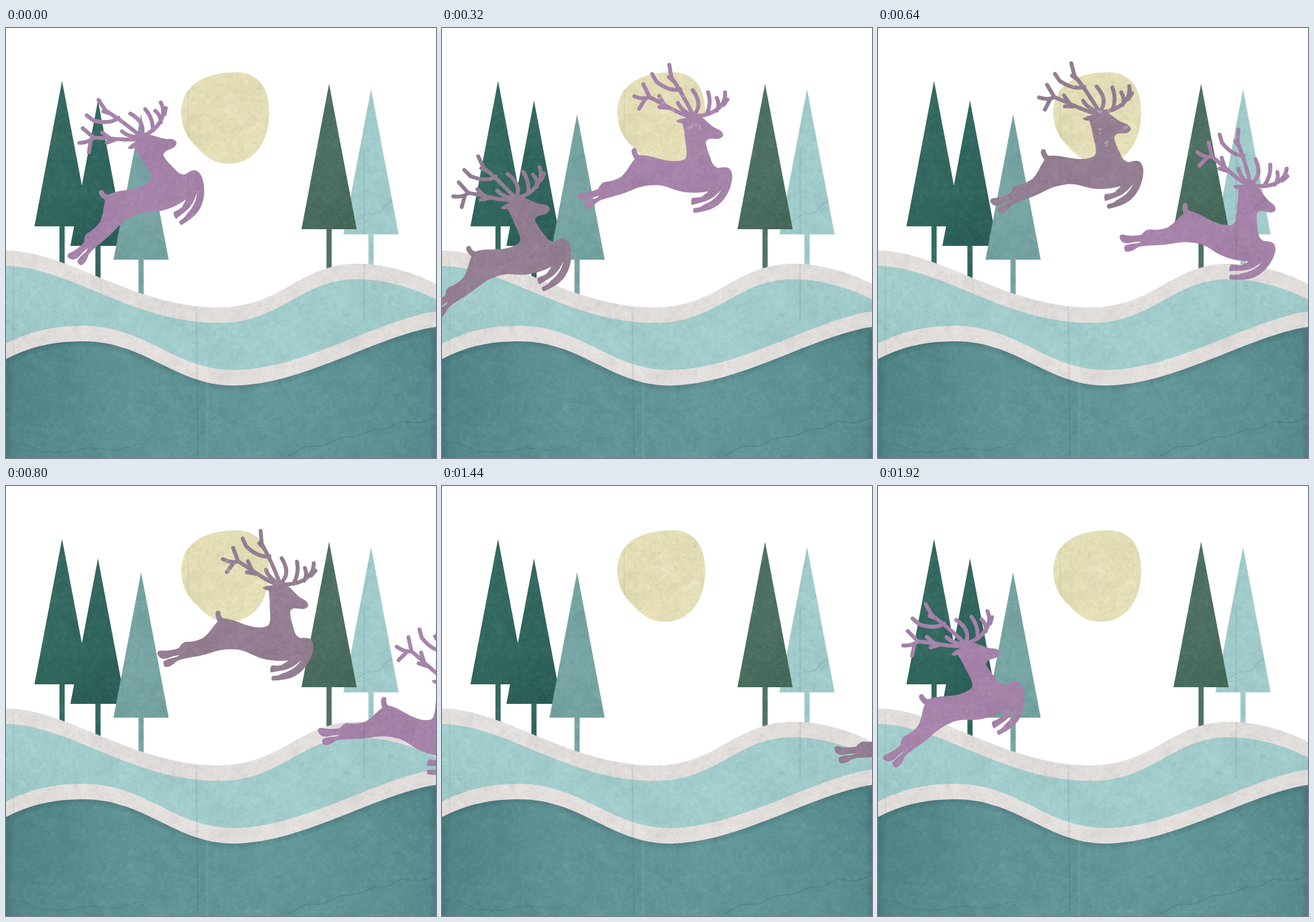
An HTML page with a canvas for the animation above (2080 ms loop, 748 px wide and 748 px high).

```html
<!DOCTYPE html>
<html lang="en">
<head>
<meta charset="utf-8">
<title>Leaping deer</title>
<style>
html, body { margin: 0; width: 100%; height: 100%; overflow: hidden; background: #fff; }
canvas { display: block; width: 100vw; height: 100vh; }
</style>
</head>
<body>
<canvas id="stage" width="748" height="748"></canvas>
<script>
const SIZE = 748, STEP = 160, STEPS = 13;
const ctx = document.getElementById('stage').getContext('2d');

let seed = 7;
const random = () => (seed = (seed * 16807) % 2147483647) / 2147483647;

function layer(size, paint) {
  const canvas = document.createElement('canvas');
  canvas.width = canvas.height = size;
  paint(canvas.getContext('2d'));
  return canvas;
}

// ---- Landscape ----
const MOON = new Path2D('M305 150C304 110 330 78 400 77C440 77 457 105 458 145' +
  'C458 195 435 236 387 236C360 236 345 222 325 200C312 186 306 170 305 150Z');
const BACK_HILL = new Path2D('M0 387C110 388 220 486 370 486C480 486 510 411 610 410' +
  'C655 410 705 423 748 445V748H0Z');
const FRONT_HILL = new Path2D('M0 549C45 526 85 518 135 518C241 518 296 595 395 595' +
  'C515 595 645 508 748 493V748H0Z');

function tree(c, x, top, ground, color, shade) {
  const base = top + 253;
  c.fillStyle = color;
  c.fillRect(x - 4.5, base, 9, ground - base);
  const fill = c.createLinearGradient(x - 20, base - 80, x + 48, base);
  fill.addColorStop(0, color);
  fill.addColorStop(1, shade);
  c.fillStyle = fill;
  c.beginPath();
  c.moveTo(x, top);
  c.lineTo(x + 48, base);
  c.lineTo(x - 48, base);
  c.fill();
}

function hill(c, path, fill) {
  c.fillStyle = '#e8e4e2';
  c.fill(path);
  c.save();
  c.translate(0, 27);
  c.fillStyle = fill;
  c.fill(path);
  c.restore();
}

const scene = layer(SIZE, c => {
  c.fillStyle = '#e9e4ba';
  c.fill(MOON);
  tree(c, 97.5, 92, 420, '#326a61', '#2d645b');
  tree(c, 160, 126, 445, '#2f675f', '#275a53');
  tree(c, 235, 150, 475, '#77a8a6', '#75a6a5');
  tree(c, 635, 106, 425, '#a4d1d1', '#a2cfcf');
  tree(c, 562, 97, 430, '#4d7263', '#426657');
  hill(c, BACK_HILL, '#a4d1d0');

  const water = c.createRadialGradient(440, 650, 60, 400, 650, 460);
  water.addColorStop(0, '#639a9a');
  water.addColorStop(.5, '#5c9393');
  water.addColorStop(1, '#4c8283');
  hill(c, FRONT_HILL, water);

  // soft shade along the lip of the front hill
  c.translate(0, 27);
  c.clip(FRONT_HILL);
  c.strokeStyle = 'rgba(30,75,78,.035)';
  for (let width = 2; width < 26; width += 4) {
    c.lineWidth = width;
    c.stroke(FRONT_HILL);
  }
});

// ---- Worn paper grain, fixed to the stage ----
const paper = layer(SIZE, c => {
  for (const [cells, strength] of [[374, .05], [125, .035], [40, .03], [12, .025]]) {
    const noise = layer(cells, n => {
      for (let i = 0; i < cells * cells; i++) {
        const v = random() - .5;
        n.fillStyle = `rgba(${v > 0 ? '255,255,255' : '0,0,0'},${Math.abs(v) * 2 * strength})`;
        n.fillRect(i % cells, Math.floor(i / cells), 1, 1);
      }
    });
    c.drawImage(noise, 0, 0, SIZE, SIZE);
  }
  const line = (path, color, width) => {
    c.strokeStyle = color;
    c.lineWidth = width;
    c.stroke(new Path2D(path));
  };
  line('M317 70V320M13 385V748', 'rgba(80,70,50,.09)', 1.5);
  line('M331 485L334 748M623 210V510', 'rgba(40,60,60,.08)', 3);
  line('M350 600V748', 'rgba(255,255,255,.06)', 5);
  line('M605 338L628 324L648 322L664 305L682 298', 'rgba(40,90,90,.13)', 1.5);
  line('M490 745L520 728L552 727L580 713L612 710L640 698L662 697L688 684L720 687L748 678',
    'rgba(20,60,62,.2)', 1.5);
  line('M0 718L35 724L62 737L105 738L145 730L188 735L232 724', 'rgba(20,60,62,.15)', 1.3);
  for (let i = 0; i < 26; i++) {
    c.fillStyle = 'rgba(255,255,230,.2)';
    c.beginPath();
    c.ellipse(315 + random() * 135, 90 + random() * 135, 1 + random() * 2, 1 + random() * 4,
      random() * 3, 0, 7);
    c.fill();
  }
});

// ---- Deer, drawn level with its tail tip at TAIL ----
const TAIL = [462, 252];
const BODY = new Path2D('M352 319Q352 313 360 314C370 316 384 314 390 312Q396 303 402 302' +
  'C415 303 425 301 434 297C447 288 452 278 461 271Q457 262 458 256Q461 249 467 254' +
  'Q466 263 471 266C487 268 498 276 514 282C528 287 542 288 548 284C553 280 553 268 553 252' +
  'C554 240 554 230 553 223Q545 222 543 217Q552 214 560 215Q572 210 584 215' +
  'C594 222 600 236 612 243Q620 247 620 255Q616 262 604 259Q592 255 588 262' +
  'C587 275 591 287 593 299Q596 308 603 310C611 310 617 310 621 314Q626 322 623 332' +
  'C618 350 606 365 592 373C580 380 562 381 548 380Q545 376 549 372Q560 373 566 369' +
  'C582 366 594 358 601 348C592 356 580 363 566 364L546 366Q545 358 549 354' +
  'C560 355 566 356 570 352Q576 350 578 347C562 348 546 345 532 340C514 333 505 322 484 321' +
  'C462 318 448 324 436 326C422 329 410 329 398 331Q386 332 380 338Q372 344 364 343' +
  'Q360 339 362 333Q368 329 385 327L390 324Q378 325 370 328Q356 331 352 319Z');
const ANTLERS = new Path2D('M574 213C567 190 559 166 547 141L547 119M559 164Q540 166 520 144L515 130' +
  'M551 150L543 140M566 213C545 203 530 187 504 169Q492 172 478 163' +
  'M504 169L497 145M496 171L483 186M535 193L518 189M528 188L521 170' +
  'M574 213Q556 204 551 187M574 213C588 203 590 188 580 169' +
  'M577 214C608 219 633 206 635 182M629 203L637 195M616 211Q623 201 619 189M597 215Q609 197 606 177');

function deer(color, [x, y, degrees]) {
  ctx.save();
  ctx.translate(x, y);
  ctx.rotate(degrees * Math.PI / 180);
  ctx.translate(-TAIL[0], -TAIL[1]);
  ctx.fillStyle = ctx.strokeStyle = color;
  ctx.lineWidth = 6.8;
  ctx.lineCap = ctx.lineJoin = 'round';
  ctx.fill(BODY);
  ctx.stroke(ANTLERS);
  ctx.restore();
}

// Each pose: tail x, tail y, tilt in degrees; one pose per step from `start`
const HERD = [
  { color: '#967f94', start: 1, poses: [
    [-75, 443, -26], [44, 380, -25.7], [146, 305, -25], [286, 211, -14], [368, 217, -4.2],
    [465, 242, 1], [552, 288, 4.5], [657, 353, 4.5], [797, 399, 4.5]] },
  { color: '#a984ad', start: 11, poses: [
    [-58, 447, -28.6], [73, 363, -29], [163, 283, -33.3], [286, 188, -20], [333, 209, -9.3],
    [462, 252, 0], [534, 304, 3.5], [657, 367, 4.4], [790, 388, 4.4]] }
];

function draw(now) {
  const step = Math.floor(now / STEP) % STEPS;
  ctx.clearRect(0, 0, SIZE, SIZE);
  ctx.drawImage(scene, 0, 0);
  for (const { color, start, poses } of HERD) {
    const pose = poses[(step - start + STEPS) % STEPS];
    if (pose) deer(color, pose);
  }
  // grain only where something is painted, so the sky stays white
  ctx.globalCompositeOperation = 'source-atop';
  ctx.drawImage(paper, 0, 0);
  ctx.globalCompositeOperation = 'source-over';
}

const begin = performance.now();
function tick() {
  draw(performance.now() - begin);
  requestAnimationFrame(tick);
}
tick();
</script>
</body>
</html>
```
